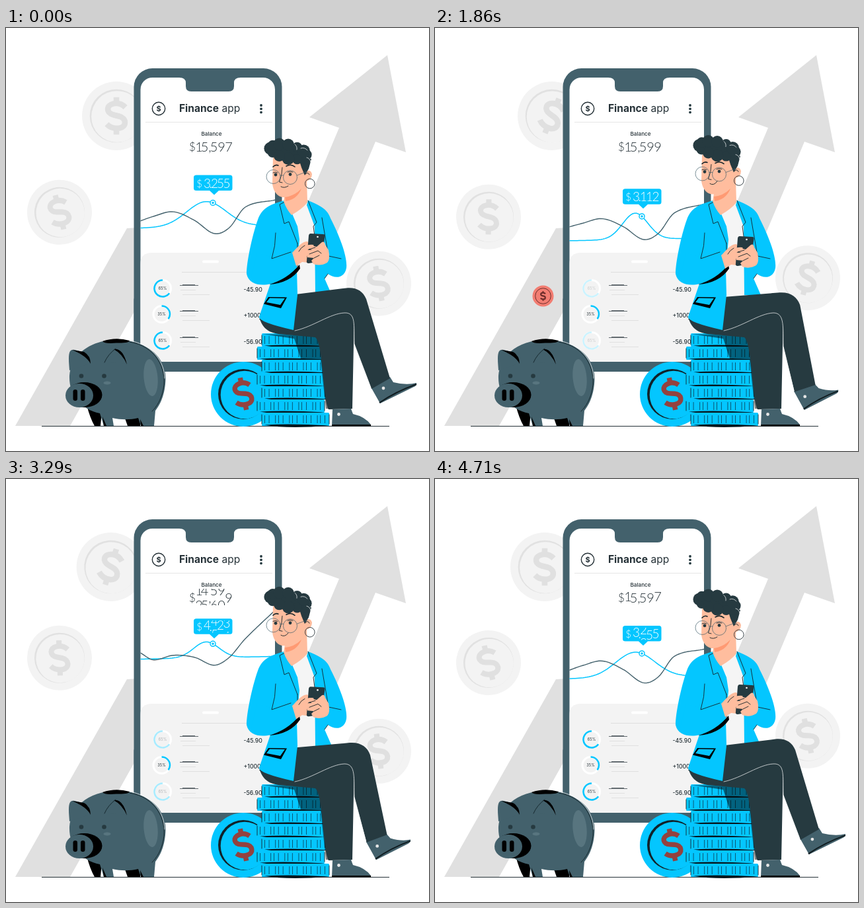
Animation, 640 px wide and 640 px high, one loop 4780 ms. Source, as an HTML page:

```html
<!DOCTYPE html>
<html lang="en">
<head>
<meta charset="utf-8">
<title>Finance app</title>
<style>
html, body { margin: 0; width: 100%; height: 100%; overflow: hidden; background: #fff; }
svg { display: block; width: 100%; height: 100%; }
text { font-family: Inter, "Open Sans", sans-serif; fill: #263238; }
.num { font-family: Lato, Inter, sans-serif; font-weight: 300; text-anchor: middle; }
.pillText text { fill: #fff; }
.mid { text-anchor: middle; }
.slate { fill: #43616c; }
.dark { fill: #263a40; }
.blue { fill: #04c6ff; }
.skin { fill: #ffbd9e; }
.ink { fill: none; stroke: #14242a; stroke-width: .9; stroke-linecap: round; stroke-linejoin: round; }
.hair { fill: none; stroke: #fff; stroke-width: .7; stroke-linecap: round; }
</style>
</head>
<body>
<svg viewBox="0 0 640 640" xmlns="http://www.w3.org/2000/svg">
<defs>
  <path id="usd" fill="none" stroke-width="8.500" d="M13.500-13C8-18.500 1-19.500-4-18.500C-16-16-15.500-4-4-1.500L4 .5C16 3.500 15.500 17 4 18.500C-3 19.500-10 17-14.500 12.500M0-28V-17M0 17V28"/>
  <g id="coin">
    <circle r="49" fill="#f3f3f3"/>
    <circle r="38" fill="#e1e1e1"/>
    <circle cx="1" cy="1" r="36.700" fill="#f3f3f3"/>
    <use href="#usd" stroke="#e0e0e0" transform="scale(.95)"/>
  </g>
  <clipPath id="screen"><rect x="203.500" y="75" width="203.500" height="430" rx="18"/></clipPath>
  <clipPath id="totalClip"><rect x="270" y="166" width="80" height="25"/></clipPath>
  <clipPath id="pillClip"><rect x="284" y="3" width="58" height="18.500"/></clipPath>
</defs>

<path fill="#e0e0e0" d="M14 602L183 303L400 290L441 301L504 151L459 135L577 41L605 188L559 172L484 350L215 392L97 602Z"/>
<g id="coins"></g>

<!-- phone -->
<rect class="slate" x="193.500" y="61" width="224" height="440" rx="28"/>
<rect class="slate" x="193.500" y="400" width="224" height="120" rx="12"/>
<rect x="203.500" y="75" width="203.500" height="430" rx="18" fill="#fff"/>
<path class="slate" d="M262 75Q272 75 272 83V88Q272 96 280 96H337Q345 96 345 88V83Q345 75 355 75Z"/>
<circle cx="231" cy="122" r="9.700" fill="none" stroke="#263238" stroke-width="1.400"/>
<text class="mid" x="231" y="126" font-size="11" font-weight="700">$</text>
<text x="262" y="127" font-size="15.500" font-weight="700">Finance</text>
<text x="326.500" y="127" font-size="15.500">app</text>
<g class="dark"><circle cx="386" cy="117" r="1.900"/><circle cx="386" cy="122.300" r="1.900"/><circle cx="386" cy="127.600" r="1.900"/></g>
<path stroke="#e6e6e6" d="M211 142.500H403"/>
<text class="mid" x="311" y="163" font-size="8.200" font-weight="500">Balance</text>
<text class="num" x="282" y="185.500" font-size="17">$</text>
<g clip-path="url(#totalClip)"><g id="total"></g><text class="num" x="308.500" y="187" font-size="20">,</text></g>

<g clip-path="url(#screen)">
  <path fill="#f3f3f3" d="M203 510V358Q203 340 221 340H390Q408 340 408 358V510Z"/>
  <rect x="297" y="351.500" width="25" height="4" rx="2" fill="#fff"/>
  <path stroke="#dedede" d="M266 369.500H378"/>
  <g id="rows"></g>
  <path id="blueLine" fill="none" stroke="#04c6ff" stroke-width="1.500"/>
  <path id="darkLine" fill="none" stroke="#43616c" stroke-width="1.400"/>
</g>
<g id="dot"><circle cx="313" r="4" fill="#fff" stroke="#04c6ff" stroke-width="1.500"/><circle class="blue" cx="313" r="1.800"/></g>
<g id="pill" class="pillText">
  <path class="blue" d="M288 0H339Q342.500 0 342.500 3.500V20Q342.500 23.500 339 23.500H322L315 30L308 23.500H288Q284 23.500 284 20V3.500Q284 0 288 0Z"/>
  <text class="num" x="292.500" y="18" font-size="15">$</text>
  <g clip-path="url(#pillClip)"><g id="pillNum"></g><text class="num" x="309.800" y="19" font-size="19">.</text></g>
</g>

<path stroke="#263238" stroke-width="1" d="M54 602.500H580"/>

<!-- dropped coin -->
<path id="rays" fill="none" stroke-width="1.500" stroke-linecap="round"/>
<g id="drop">
  <circle id="dropFace" r="16"/>
  <circle id="dropRing" r="11.800" fill="none" stroke-width="1"/>
  <use id="dropSign" href="#usd" transform="scale(.26)"/>
</g>

<!-- piggy bank -->
<path d="M122 570H146L143 602H134Q127 590 122 570ZM178 585H203V602H184Z"/>
<path class="slate" d="M96 526C98 496 124 475 160 472C207 469 241.500 494 241.500 530C241 555 233 570 226 579L224 602H204L200 590C188 593 174 593 161 590L163 602H148L142 583C112 576 95 555 96 526Z"/>
<path d="M146 588L148 602H152ZM203 592L204 602H208Z"/>
<path class="slate" d="M96 518C95 504 94 494 97 489Q99 486 104 487L120 491Q128 497 127 508Z"/>
<path d="M100 487L118 490Q128 496 128 508Q122 496 100 487Z"/>
<path class="slate" d="M149 506Q154 494 166 485Q176 486 182 508Z"/>
<path d="M163 486Q177 484 183 509Q176 493 163 486Z"/>
<path class="ink" d="M149 506Q154 494 166 485"/>
<path d="M146 474Q166 467 187 473Q186 477 167 476.500Q149 478 146 474Z"/>
<path class="ink" stroke-width=".7" d="M187 475C226 481 244 515 238 546C235 562 228 573 221 580"/>
<path class="hair" d="M192 474C222 481 240 505 240 530"/>
<ellipse cx="219" cy="529" rx="10.500" ry="28" transform="rotate(-5 219 529)" fill="#58757f"/>
<ellipse cx="118.500" cy="555" rx="27" ry="19"/>
<ellipse class="slate" cx="111" cy="556" rx="21" ry="18"/>
<rect x="101.500" y="547" width="6.500" height="17" rx="3.200"/><rect x="113" y="547" width="6.500" height="17" rx="3.200"/>
<circle class="dark" cx="114" cy="526.500" r="3.300"/><circle class="dark" cx="148.500" cy="526.500" r="3.300"/>
<ellipse cx="153" cy="537" rx="5.500" ry="2.600" fill="#58757f"/>

<!-- blue coins -->
<circle class="blue" cx="359" cy="554" r="49"/>
<circle cx="359" cy="554" r="38" fill="#10222a"/>
<circle class="blue" cx="361" cy="555" r="36.300"/>
<use href="#usd" stroke="#93423f" transform="translate(359 553.500) rotate(-11) scale(.88)"/>
<g id="stack"></g>
<path d="M388 463L486 466L489 520L492 576L484 576L476 502L446 500L436 470Z" opacity=".5"/>

<!-- person -->
<path fill="#f5f5f5" d="M425 272L441 297V410H470L466 300L457 262Z"/>
<path class="blue" d="M457 261C478 269 487 276 491 288C504 313 517 346 515 363C513 377 499 381 487 372L482 379L493 404H468L467 300L455 268Z"/>
<path class="ink" d="M457 261L470 294L465 300L469 330M478 287L488 345L507 349M487 372L482 379"/>
<path class="dark" d="M384 440C390 460 405 463 425 464L468 468C480 478 479 560 488 577L524 576L527 430H440Z"/>
<path class="slate" d="M494 577L522 576L525 584Q543 588 552 600V602H493Z"/>
<path d="M493 600H552V602.500H493Z"/><circle cx="503.500" cy="584.500" r="2.400" fill="#e6e6e6"/>
<path id="shoe" class="slate"/>
<path id="sole" fill="none" stroke="#101c20" stroke-width="2"/>
<circle id="shoeDot" r="2.400" fill="#e6e6e6"/>
<path id="leg" class="dark"/>
<path id="seam" class="hair"/>

<path class="blue" d="M424 260C400 267 388 271 381 290C372 315 364 355 364 372C367 388 386 391 400 387L383 437Q382 445 435 457L441 404L440 362L444 320L441 300Z"/>
<path d="M398 388Q426 380 444 358L445 364Q430 386 398 388Z"/>
<path class="blue" d="M380 340L407 348L434 338Q438 348 440 361Q420 376 398 386Q378 388 370 380Z"/>
<path class="ink" d="M424 262L414 267L421 296L428 293L441 326M408 310Q408 330 402 349L431 339M441 326V362"/>
<path d="M397 407L425 407.500L416 424L390 417.500Z"/><path class="blue" d="M399 408.500L422 409L415 419L394 415Z"/>
<path class="skin" d="M423 245L455 226L456 264Q448 274 432 283Q424 274 420 262Z"/>
<path fill="#ff9a73" d="M422 255Q436 254 447 243Q440 260 423 262Z"/>

<g id="head">
  <path class="skin" d="M404 196L403 236C405 250 413 257 422 256C437 254 449 244 453 232Q463 230 463 221Q461 213 453 217L452 198Z"/>
  <g class="dark" id="curls"><ellipse cx="427" cy="188" rx="27" ry="13" transform="rotate(10 427 188)"/><path d="M443 198H462L458 213L452 223L447 211Z"/></g>
  <path class="hair" d="M446 182Q452 180 456 185M455 196Q460 197 461 203M437 176Q441 179 440 184"/>
  <path class="ink" d="M418 211Q418 222 413.500 233L418 234M453 221Q457 217 459 222"/>
  <path class="ink" style="stroke-width:1.600" d="M404 210Q408 206 412 208M424 209Q431 205 437 210"/>
  <circle class="dark" cx="408" cy="222" r="2.400"/><circle class="dark" cx="430" cy="221.500" r="2.400"/>
  <path class="ink" d="M404 219Q408 217 411 219M426 218Q430 216 434 218"/>
  <g fill="none" stroke="#43616c" stroke-width=".7"><circle cx="404.500" cy="225" r="10.500"/><circle cx="430" cy="226" r="10.500"/><path d="M415 223L420 223M440 223L456 217"/></g>
  <circle cx="459.800" cy="235.500" r="7.300" fill="none" stroke="#263238" stroke-width=".9"/>
  <path id="mouth" class="ink"/>
</g>
<g id="hands">
  <path class="skin" d="M433 340C440 333 448 322 456 323L462 331L457 355L448 354L439 360Z"/>
  <path class="dark" d="M461 311L480 312Q483 312 482.500 315L477 353L458 356Q454 356 455 352L458 314Q458.500 311 461 311Z"/>
  <circle cx="471.500" cy="316" r="1.300" fill="#fff"/>
  <path class="skin" d="M478 324Q482 322 483 328L488 336Q491 350 486 355Q476 361 465 357L462 352L466 348L456 347L455 342L463 336L456 332L458 328L470 331Z"/>
  <path class="skin" d="M444 335Q456 326 465 328Q468 331 456 336Q466 335 471 338Q468 341 458 342L448 352Z"/>
  <path class="ink" d="M458 335L468 332M459 342L472 337L477 341M466 348L474 344M443 338Q446 332 452 329"/>
</g>
</svg>
<script>
const LOOP = 4780, STEPS = 67, ROLL = 360;
const $ = id => document.getElementById(id);
const lerp = (a, b, k) => a + (b - a) * k;
const clamp = k => Math.max(0, Math.min(1, k));
const ramp = (t, a, b) => { const k = clamp((t - a) / (b - a)); return k * k * (3 - 2 * k); };
const set = (el, attrs) => { for (const k in attrs) el.setAttribute(k, attrs[k]); return el; };
const add = (parent, tag, attrs) =>
  parent.appendChild(set(document.createElementNS('http://www.w3.org/2000/svg', tag), attrs));
const shade = (a, b, k) => `rgb(${a.map((v, i) => Math.round(lerp(v, b[i], k)))})`;
const phase = t => t / LOOP * 2 * Math.PI;

// Smooth curve through [x, y] points
function curve(points, x) {
  const last = points.length - 1;
  const slope = i => {
    const a = points[Math.max(0, i - 1)], b = points[Math.min(last, i + 1)];
    return (b[1] - a[1]) / (b[0] - a[0]);
  };
  let i = last - 1;
  while (i > 0 && points[i][0] > x) i--;
  const [x0, a] = points[i], [x1, b] = points[i + 1];
  const d = x1 - x0, k = (x - x0) / d, j = 1 - k;
  return a * j * j * (1 + 2 * k) + b * k * k * (3 - 2 * k) + d * k * j * (slope(i) * j - slope(i + 1) * k);
}

function plot(f) {
  let d = '';
  for (let x = 203; x <= 408; x += 3) d += `${d ? 'L' : 'M'}${x} ${f(x).toFixed(2)}`;
  return d;
}

// Blend two path strings of the same structure
function morph(a, b, k) {
  const to = b.match(/-?[\d.]+/g);
  let i = 0;
  return a.replace(/-?[\d.]+/g, n => lerp(+n, +to[i++], k).toFixed(2));
}

// Rolling digits: each [time, value] starts a roll, every digit taking its shortest way
function counter(parent, xs, first, changes, size, base, row) {
  const cells = xs.map(x => [0, 1].map(() => add(parent, 'text', { class: 'num', x, 'font-size': size })));
  return t => cells.forEach((pair, i) => {
    let v = +String(first)[i], digit = v;
    for (const [at, value] of changes) {
      const next = +String(value)[i];
      const move = (next - digit + 14) % 10 - 4;
      v += (Math.abs(next - digit) === 5 ? next - digit : move) * ramp(t, at, Math.min(LOOP, at + ROLL));
      digit = next;
    }
    const whole = Math.floor(v);
    pair.forEach((el, j) => {
      el.textContent = (whole + j + 10) % 10;
      el.setAttribute('y', base + (whole + j - v) * row);
    });
  });
}
const rollTotal = counter($('total'), [292, 300.5, 314.5, 326, 337], 15597,
  [[450, 15598], [1300, 15599], [2600, 15600], [3100, 24598], [3680, 25598], [4440, 15597]], 20, 187, 22);
const rollPill = counter($('pillNum'), [304.5, 315.5, 324.5, 334], 3255,
  [[540, 3133], [1200, 3112], [2550, 4423], [3200, 5735], [4400, 3255]], 19, 19, 20);

// Background coins: drift plus tilt
const coins = [
  { s: 1.06, pose: w => [168.500 + 11.500 * Math.sin(w - .13), 133, 12.500 - 12.500 * Math.cos(w)] },
  { s: 1, pose: w => [81, 279.300 + 9.500 * Math.sin(w - .05), -5.500 - 8.500 * Math.cos(w)] },
  { s: 1, pose: w => [564, 390 - 22.500 * Math.sin(w + .15), 16 * Math.sin(w - .7)] }
];
for (const c of coins) c.el = add($('coins'), 'use', { href: '#coin' });

// Transaction rows
const fading = [];
[[394, 65, '-45.90'], [433, 35, '+1000'], [473, 65, '-56.90']].forEach(([y, pct, sum]) => {
  const g = $('rows'), major = pct > 50;
  const ring = { cx: major ? 237 : 235.5, cy: y, r: 12.5, fill: 'none' };
  add(g, 'circle', { ...ring, stroke: '#fff', 'stroke-width': 3 });
  const part = add(g, 'g', {});
  add(part, 'circle', { ...ring, stroke: '#04c6ff', 'stroke-width': 2.6, pathLength: 100,
    'stroke-dasharray': `${pct} 100`, transform: `rotate(${major ? 36 : -90} ${ring.cx} ${y})` });
  add(part, 'text', { class: 'mid', x: ring.cx, y: y + 2, 'font-size': 5.6 }).textContent = pct + '%';
  if (major) fading.push(part);
  add(g, 'path', { stroke: '#263238', 'stroke-width': .7, d: `M263 ${y - 4.5}H291M267 ${y - 5.5}H286` });
  add(g, 'path', { stroke: '#dcdcdc', 'stroke-width': .8, d: `M264 ${y + 2.5}H287M267 ${y + 9.5}H308` });
  add(g, 'text', { x: 359.5, y: y + 5, 'font-size': 8.7, 'font-weight': 500 }).textContent = sum;
});

// Coin stack
for (let i = 0; i < 7; i++) {
  const x = 387 - i % 2 * 7, y = 462 + i * 20, w = 102, g = $('stack');
  add(g, 'rect', { class: 'blue', x, y, width: w, height: 20, rx: 1.5 });
  add(g, 'path', { stroke: '#0b2b38', 'stroke-width': 12, 'stroke-dasharray': '.7 6 .7 9 .7 4', d: `M${x + 4} ${y + 10}H${x + w - 2}` });
  add(g, 'path', { class: 'ink', d: `M${x} ${y + 17}V${y + 3}M${x + w} ${y + 3}V${y + 17}` });
  add(g, 'path', { d: `M${x + 4} ${y + 18.5}Q${x + 45} ${y + 16} ${x + w} ${y + 19.5}Q${x + 40} ${y + 25} ${x + 4} ${y + 18.5}Z`, fill: '#06171e' });
}

// Curly hair: a tilted ring of locks
for (let i = 0; i < 12; i++) {
  const a = i * Math.PI / 6, dx = 27 * Math.cos(a);
  add($('curls'), 'circle', { cx: 427 + dx, cy: 187 + .18 * dx + 10.5 * Math.sin(a), r: 8.6 + Math.sin(i * 2.4) });
}

const poses = {
  leg: ['M430 404L515 393.500C530 392 540 398 545 410L581 530L553 546L527 478C526 450 530 430 512 431C490 432 465 452 437 458L395 455L383 440Z',
    'M430 408L522 401C539 400 549 408 553 420L575 541L543 551L527 482C526 456 530 431 512 431C490 432 465 452 437 458L395 455L383 440Z'],
  seam: ['M437 458C465 452 490 432 512 431C530 430 526 450 527 478L552 544', 'M437 458C465 452 490 432 512 431C530 431 526 456 527 482L542 549'],
  shoe: ['M553 545L581 528L586 536Q606 541 621 537Q622 541 617 543L566 568Z', 'M542 550L574 540L580 546Q596 551 609 548.500Q610 552 605 555L558 579Z'],
  sole: ['M565 567Q590 550 621 539', 'M557 577.500Q580 561 608.500 550.500'],
  mouth: ['M416 240Q421 243 427 239', 'M416 240Q422 244 427 236']
};

// Height of the marked point and of the dark line's dip
const level = [[-70, 264], [0, 264.5], [790, 281.5], [1430, 291], [2210, 276], [2790, 254.5], [3790, 249.5], [4710, 264], [LOOP, 264.5]];
const dip = [[0, 311], [1180, 334], [2210, 310], [3790, 276], [LOOP, 311]];

function drawChart(t) {
  const y = curve(level, t), low = curve(dip, t);
  const climb = ramp(t, 1600, 3000) - ramp(t, 3900, 4720);
  const width = 27 + 15 * Math.max(0, Math.cos(phase(t))) ** 2;
  const rise = 36 - 15 * climb;
  const bump = x => Math.exp(-(((x - 303) / width) ** 2));
  set($('blueLine'), { d: plot(x => y + rise * (1 - bump(x) / bump(313)) - (x - 313) * .02) });
  const shape = [[203, -19], [223, -26 + 18 * climb], [253, -33 + 18 * climb], [285, -20 + 8 * climb],
    [315, 0], [338, -9 - 3 * climb], [362, -40], [408, -51 - 33 * climb]];
  set($('darkLine'), { d: plot(x => low + curve(shape, x)) });
  set($('dot'), { transform: `translate(0 ${y})` });
  set($('pill'), { transform: `translate(0 ${y - 42 + 4 * climb})` });
}

// Coin pops up, turns red and falls into the slot
function drawDrop(t) {
  const red = ramp(t, 850, 1350), fall = Math.max(0, (t - 1900) / 310);
  const y = 405.5 + 54.5 * fall * fall, maroon = [110, 45, 42];
  set($('drop'), { opacity: t > 560 && y < 500 ? 1 : 0,
    transform: `translate(163.500 ${y}) scale(${ramp(t, 520, 760)})` });
  set($('dropFace'), { fill: shade([245, 245, 245], [242, 125, 114], red) });
  set($('dropRing'), { stroke: shade([110, 110, 110], maroon, red) });
  set($('dropSign'), { stroke: shade([185, 185, 185], maroon, red) });
  const k = clamp((t - 700) / 760), r0 = lerp(19, 34, k), r1 = lerp(32, 37, k);
  let d = '';
  for (let i = 0; i < 8; i++) {
    const c = Math.cos(i * Math.PI / 4), s = Math.sin(i * Math.PI / 4);
    d += `M${163.5 + c * r0} ${405.5 + s * r0}L${163.5 + c * r1} ${405.5 + s * r1}`;
  }
  set($('rays'), { d, opacity: t > 640 && t < 1500 ? 1 : 0, stroke: shade([255, 255, 255], [160, 75, 66], red) });
}

function draw(t) {
  const w = phase(t), sway = ((1 - Math.cos(w)) / 2) ** .8;
  for (const c of coins) {
    const [x, y, a] = c.pose(w);
    set(c.el, { transform: `translate(${x} ${y}) rotate(${a}) scale(${c.s})` });
  }
  drawChart(t);
  rollTotal(t);
  rollPill(t);
  fading.forEach(el => set(el, { opacity: 1 - .88 * sway }));

  for (const id in poses) set($(id), { d: morph(...poses[id], sway) });
  set($('shoeDot'), { cx: lerp(571, 558.5, sway), cy: lerp(545, 559, sway) });
  set($('head'), { transform: `translate(0 ${-5 * sway})` });
  set($('hands'), { transform: `translate(0 ${4.5 * sway})` });
  drawDrop(t);
}

const start = performance.now();
function tick() {
  const t = (performance.now() - start) % LOOP;
  draw(Math.floor(t * STEPS / LOOP + .1) % STEPS * LOOP / STEPS);
  requestAnimationFrame(tick);
}
tick();
</script>
</body>
</html>
```
